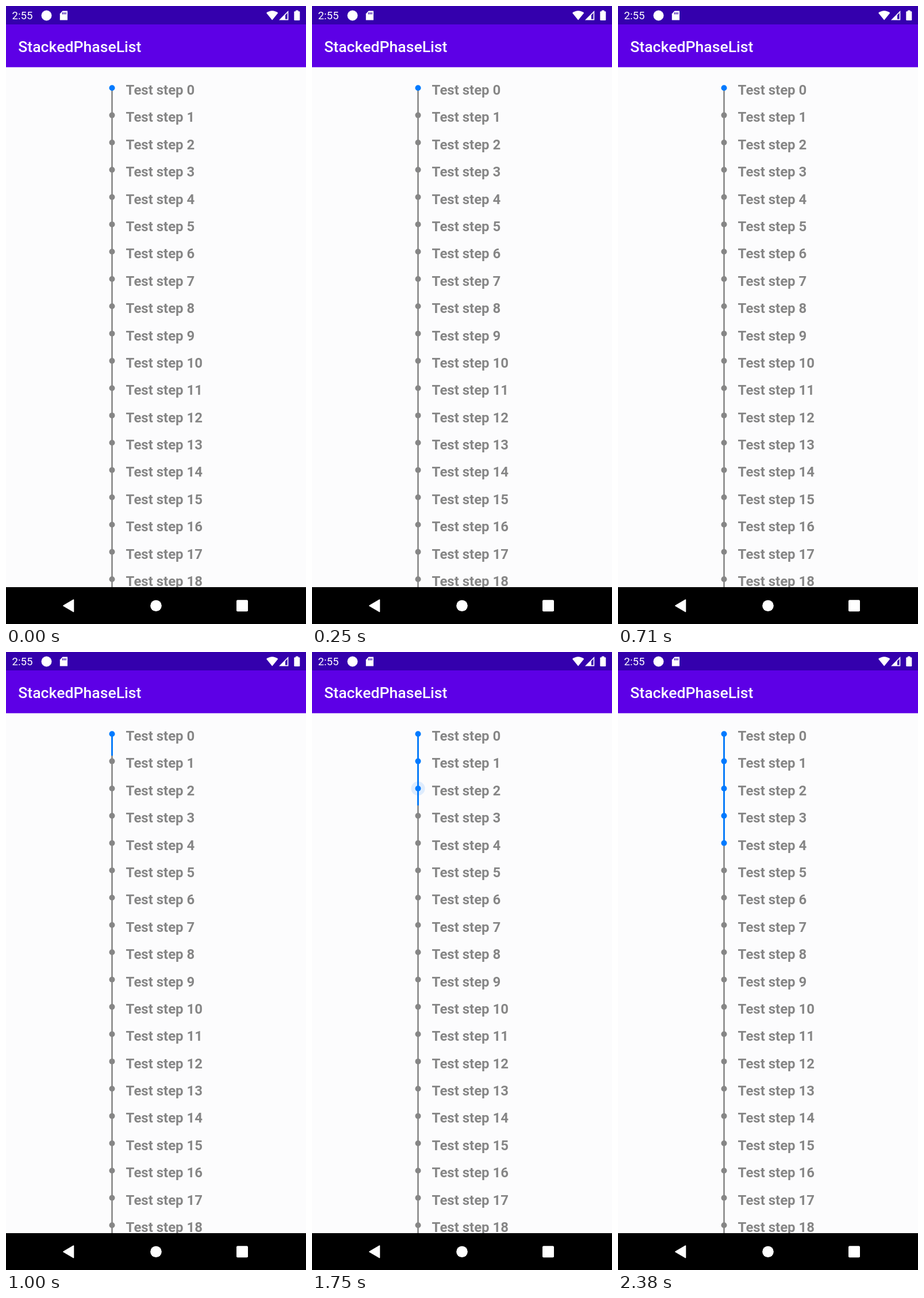
Animation, 522 px wide and 1073 px high, one loop 2420 ms. Source, as an HTML page with a canvas:

```html
<!DOCTYPE html>
<html lang="en">
<head>
<meta charset="utf-8">
<title>Step list</title>
<style>
html, body { margin: 0; width: 100%; height: 100%; overflow: hidden; background: #fcfcfd; }
canvas { display: block; width: 522px; height: 1073px; }
</style>
</head>
<body>
<canvas id="stage" width="522" height="1073"></canvas>
<script>
const ctx = document.getElementById('stage').getContext('2d');
const W = 522, H = 1073, LOOP = 2420;
const BLUE = '#007aff', GREY = '#868686', STATUS = '#3400ad';
const FONT = 'Roboto, sans-serif';
const X = 184.5, TOP = 142.2, GAP = 47.39, STEPS = 20, LAST = 4;
const START = 720, STEP_MS = 400, HALO_MS = 340;

const clamp = v => Math.max(0, Math.min(1, v));
const ease = v => 0.5 - 0.5 * Math.cos(Math.PI * clamp(v));
const stepY = i => TOP + i * GAP;

function rect(x, y, w, h, color) {
  ctx.fillStyle = color;
  ctx.fillRect(x, y, w, h);
}

function round(x, y, w, h, r, color) {
  ctx.fillStyle = color;
  ctx.beginPath();
  ctx.roundRect(x, y, w, h, r);
  ctx.fill();
}

function dot(x, y, r, color) {
  ctx.fillStyle = color;
  ctx.beginPath();
  ctx.arc(x, y, r, 0, Math.PI * 2);
  ctx.fill();
}

function poly(points, color) {
  ctx.fillStyle = color;
  ctx.beginPath();
  points.forEach(([x, y]) => ctx.lineTo(x, y));
  ctx.closePath();
  ctx.fill();
}

function text(str, x, y, style, color) {
  ctx.font = style + ' ' + FONT;
  ctx.fillStyle = color;
  ctx.fillText(str, x, y);
}

function statusBar() {
  rect(0, 0, W, 32, STATUS);
  text('2:55', 10.5, 23, '400 18.6px', '#fff');
  dot(70.5, 16.5, 9, '#fff');

  // memory card
  poly([[98.5, 8.5], [107, 8.5], [107, 24.5], [93.8, 24.5], [93.8, 13.5]], '#fff');
  for (let i = 0; i < 3; i++) rect(98 + i * 2.7, 11, 1.4, 3.5, STATUS);

  // wifi
  ctx.fillStyle = '#fff';
  ctx.beginPath();
  ctx.moveTo(463.2, 24.5);
  ctx.lineTo(453, 12);
  ctx.quadraticCurveTo(463.2, 4.5, 473.4, 12);
  ctx.fill();

  // signal
  poly([[475, 24.5], [491.3, 8], [491.3, 24.5]], '#fff');
  poly([[486, 15.7], [489.6, 12], [489.6, 22.8], [486, 22.8]], STATUS);

  // battery
  round(504, 7.5, 4.6, 4, 0.5, '#fff');
  round(501.3, 9.2, 10, 15.8, 1.2, '#fff');
}

function navBar() {
  rect(0, 1009, W, H - 1009, '#000');
  poly([[100, 1041.3], [117.5, 1031], [117.5, 1051.6]], '#fff');
  ctx.strokeStyle = '#fff';
  ctx.lineWidth = 1.6;
  ctx.lineJoin = 'round';
  ctx.stroke();
  dot(261, 1041.3, 9.8, '#fff');
  round(401, 1031.3, 20, 20, 2, '#fff');
}

function steps(time) {
  const run = clamp((time - START) / (STEP_MS * LAST)) * LAST;
  const done = Math.floor(run);
  const reach = done + ease(run - done);

  rect(X - 1.3, TOP, 2.6, 1009 - TOP, GREY);
  rect(X - 1.4, TOP, 2.8, reach * GAP, BLUE);

  for (let i = 0; i < STEPS; i++) {
    const y = stepY(i);
    const age = (time - START - i * STEP_MS) / HALO_MS;
    if (i > 0 && age > 0 && age < 1) {
      const e = ease(age);
      dot(X, y, 15.8 * e, `rgba(0,122,255,${0.5 * (1 - e)})`);
    }
    dot(X, y, 5, i <= done ? BLUE : GREY);
    text('Test step ' + i, 208.6, y + 11.8, '700 23.96px', GREY);
  }
}

function draw(time) {
  rect(0, 0, W, H, '#fcfcfd');
  steps(time);
  rect(0, 32, W, 74.3, '#5d00e6');
  text('StackedPhaseList', 21.3, 79.8, '500 26.6px', '#fff');
  statusBar();
  navBar();
}

const begin = performance.now();
function frame() {
  draw((performance.now() - begin) % LOOP);
  requestAnimationFrame(frame);
}
frame();
</script>
</body>
</html>
```
